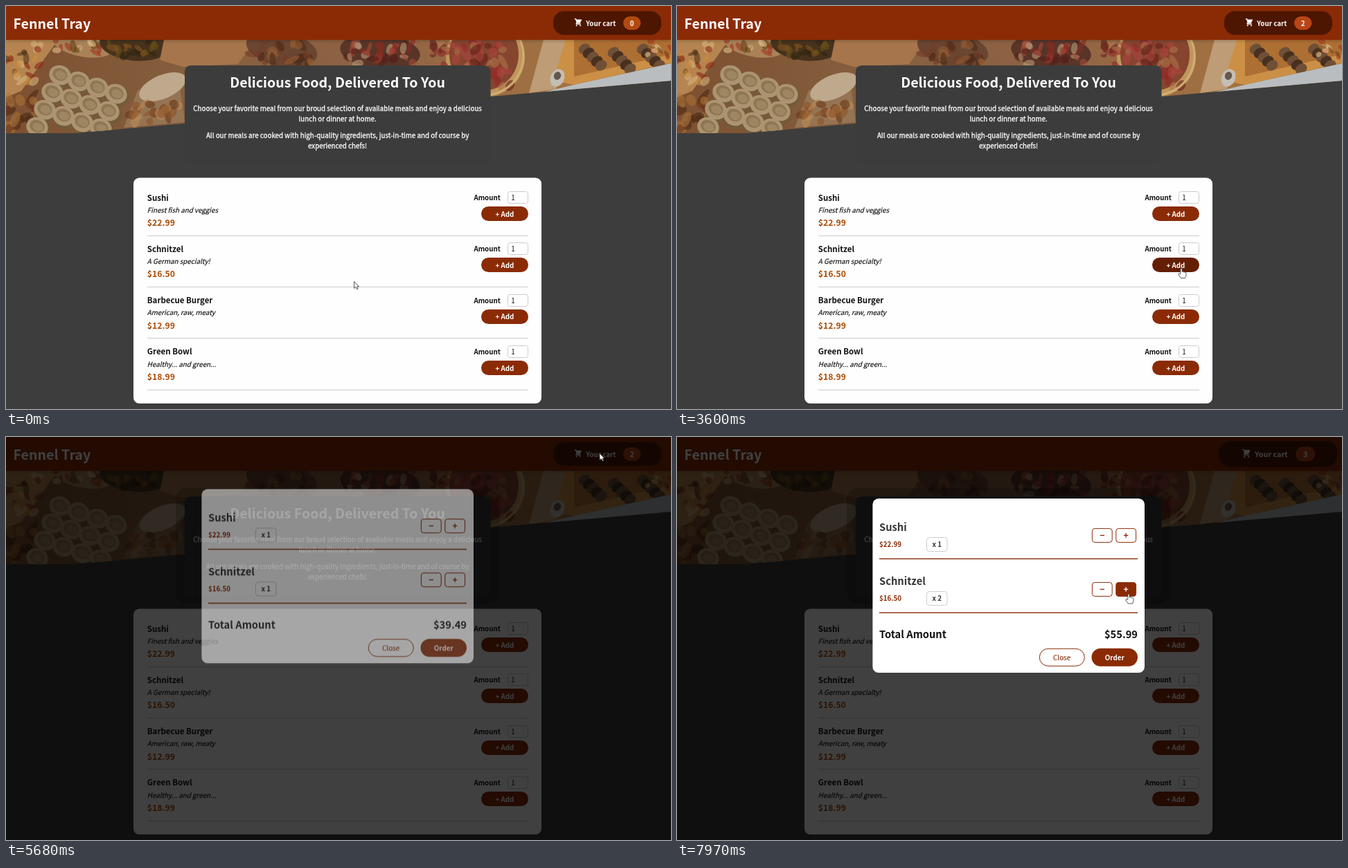
Write an HTML page with a canvas that moves like this. It is 960 px wide and 583 px high and loops after 8000 ms.

```html
<!DOCTYPE html>
<html lang="en">
<head>
<meta charset="utf-8">
<title>Meal ordering</title>
<style>
html, body { margin: 0; width: 100%; height: 100%; overflow: hidden; background: #3d3d3d; }
canvas { display: block; width: 960px; height: 583px; }
</style>
</head>
<body>
<canvas id="stage" width="960" height="583"></canvas>
<script>
const W = 960, H = 583, LOOP = 8000;
const REM = 9.8, MID = 478.6, PITCH = 74.25;
const RUST = '#8a2b06';
const FAMILY = '"Noto Sans CJK JP", "Noto Sans CJK SC", "Noto Sans", sans-serif';
const stage = document.getElementById('stage').getContext('2d');
const layer = Object.assign(document.createElement('canvas'), { width: W, height: H }).getContext('2d');
let ctx = stage;

const ADD_FIRST = 2256, ADD_SECOND = 3595, OPEN_CART = 5570, ADD_THIRD = 7710;
const BUMPS = [ADD_FIRST, 3612, 7787];
const MEALS = [
  ['Sushi', 'Finest fish and veggies', '$22.99'],
  ['Schnitzel', 'A German specialty!', '$16.50'],
  ['Barbecue Burger', 'American, raw, meaty', '$12.99'],
  ['Green Bowl', 'Healthy... and green...', '$18.99']
];
// time, x, y of the pointer tip
const PATH = [
  [0, 502.5, 398.5], [750, 502.5, 398.5], [1390, 721, 297.5], [1690, 721, 297.5],
  [1810, 721, 301.5], [2520, 721, 301.5], [3060, 729, 406], [3420, 728, 379.5],
  [3890, 728, 379.5], [4220, 727, 453], [4590, 727, 453], [5140, 857, 23.5],
  [5700, 857, 23.5], [6350, 506.5, 191], [6390, 506.5, 191], [6560, 427, 200],
  [6960, 700, 226], [7140, 661, 227], [7260, 661, 227], [7310, 652, 227], [8000, 652, 227]
];
const BUMP_KEYS = [[0, 1], [.1, .9], [.3, 1.1], [.5, 1.15], [1, 1]];

const mix = (a, b, p) => a + (b - a) * p;
const smooth = p => p * p * (3 - 2 * p);
const inside = (p, x, y, w, h) => p.x >= x && p.x <= x + w && p.y >= y && p.y <= y + h;

// cubic-bezier(0, 0, .58, 1)
function easeOut(p) {
  let lo = 0, hi = 1;
  for (let i = 0; i < 20; i++) {
    const s = (lo + hi) / 2;
    if (1.74 * s * s * (1 - s) + s ** 3 < p) lo = s; else hi = s;
  }
  return 3 * lo * lo * (1 - lo) + lo ** 3;
}

function pointerAt(t) {
  const i = Math.max(1, PATH.findIndex(k => k[0] > t));
  const [t0, x0, y0] = PATH[i - 1], [t1, x1, y1] = PATH[i];
  const p = smooth((t - t0) / (t1 - t0));
  return { x: mix(x0, x1, p), y: mix(y0, y1, p) };
}

function bumpScale(t) {
  const start = BUMPS.find(b => t >= b && t < b + 300);
  if (start === undefined) return 1;
  const p = (t - start) / 300;
  const i = BUMP_KEYS.findIndex(k => k[0] > p);
  const [p0, s0] = BUMP_KEYS[i - 1], [p1, s1] = BUMP_KEYS[i];
  return mix(s0, s1, easeOut((p - p0) / (p1 - p0)));
}

// Baselines sit on whole pixels; `heavy` thickens the strokes slightly
function text(str, x, y, { size = REM, style = 'bold', color = '#111', align = 'left', heavy = 0 } = {}) {
  ctx.font = `${style} ${size}px ${FAMILY}`;
  ctx.fillStyle = ctx.strokeStyle = color;
  ctx.textAlign = align;
  ctx.fillText(str, x, Math.round(y));
  if (heavy) {
    ctx.lineWidth = heavy;
    ctx.strokeText(str, x, Math.round(y));
  }
}

function box(x, y, w, h, r, fill, stroke, line = 1) {
  ctx.beginPath();
  ctx.roundRect(x, y, w, h, r);
  if (fill) { ctx.fillStyle = fill; ctx.fill(); }
  if (stroke) { ctx.strokeStyle = stroke; ctx.lineWidth = line; ctx.stroke(); }
}

function poly(c, color, ...pts) {
  c.fillStyle = color;
  c.beginPath();
  pts.forEach(([x, y]) => c.lineTo(x, y));
  c.closePath();
  c.fill();
}

function oval(c, color, x, y, rx, ry = rx, turn = 0) {
  c.fillStyle = color;
  c.beginPath();
  c.ellipse(x, y, rx, ry, turn, 0, 7);
  c.fill();
}

// Soft abstract buffet behind the headline
function makeBanner() {
  const canvas = document.createElement('canvas');
  canvas.width = W;
  canvas.height = 190;
  const c = canvas.getContext('2d');
  let seed = 11;
  const rnd = () => (seed = seed * 16807 % 2147483647) / 2147483647;
  const scatter = (n, x, y, w, h, size, colors) => {
    c.globalAlpha = .6;
    for (let i = 0; i < n; i++) {
      oval(c, colors[i % colors.length], x + rnd() * w, y + rnd() * h,
        size * (.6 + rnd()), size * (.4 + rnd() * .5), rnd() * 3);
    }
    c.globalAlpha = 1;
  };
  c.beginPath();
  [[0, 49], [W, 49], [W, 108], [98, 184], [0, 184]].forEach(p => c.lineTo(...p));
  c.clip();
  const base = c.createLinearGradient(0, 0, W, 0);
  base.addColorStop(0, '#7d5030');
  base.addColorStop(.3, '#85603f');
  base.addColorStop(.55, '#8f6244');
  base.addColorStop(1, '#ad7b40');
  c.fillStyle = base;
  c.fillRect(0, 0, W, 190);

  poly(c, '#b58450', [0, 49], [75, 49], [22, 123], [0, 132]);
  scatter(24, 2, 54, 48, 58, 6, ['#8c2717', '#d5b27e', '#573719', '#c98a3c']);
  oval(c, '#a98258', 110, 55, 45, 18, .2);
  scatter(14, 72, 50, 68, 18, 6, ['#a13420', '#674217', '#e0bf8a']);
  oval(c, '#46321c', 185, 56, 50, 23, .1);
  scatter(16, 148, 50, 72, 22, 6, ['#695019', '#82531f', '#302512']);
  poly(c, '#a6754b', [228, 49], [360, 49], [335, 84], [255, 88], [222, 78]);
  poly(c, '#957453', [190, 122], [250, 108], [258, 168], [170, 176]);
  oval(c, '#bfa98c', 226, 117, 36, 17, -.4);
  scatter(18, 178, 140, 76, 34, 8, ['#6b3a1c', '#b98a56', '#8e5428']);
  scatter(20, 0, 130, 60, 48, 8, ['#6d3519', '#a77236', '#4d2b16']);

  for (let i = 0; i < 13; i++) {
    const x = 78 + (i % 4) * 27 - Math.floor(i / 4) * 11;
    const y = 100 + Math.floor(i / 4) * 25 + (i % 4) * 9;
    oval(c, '#735a3a', x + 2, y + 4, 17, 16);
    oval(c, '#ac9470', x, y, 16, 14, .4);
    oval(c, '#8f7653', x, y - 1, 11, 9, .4);
    oval(c, '#9f8662', x + 1, y, 8, 6, .4);
  }

  oval(c, '#6a4530', 398, 62, 52, 25, .2);
  scatter(24, 350, 50, 92, 34, 8, ['#4c2a19', '#925d32', '#743c25']);
  oval(c, '#593528', 540, 66, 58, 25, .1);
  scatter(32, 490, 50, 100, 34, 7, ['#8f2820', '#a34a38', '#552019', '#b99a77']);
  oval(c, '#c0965d', 692, 74, 57, 57);
  oval(c, '#85452e', 690, 70, 50, 52);
  scatter(52, 610, 50, 118, 66, 8, ['#932b27', '#ae4540', '#65221c', '#ad744b']);
  c.strokeStyle = '#d0ad72';
  c.lineWidth = 3;
  c.beginPath();
  c.arc(690, 72, 57, -.4, 1.4);
  c.stroke();

  poly(c, '#bd9c76', [776, 49], [812, 49], [794, 120], [755, 126]);
  poly(c, '#cc8f46', [808, 49], [W, 49], [W, 82], [820, 114], [790, 108]);
  poly(c, '#ae6f33', [820, 49], [W, 49], [W, 70], [820, 102]);
  for (let i = 0; i < 3; i++) {
    for (let j = 0; j < 5; j++) {
      oval(c, j % 2 ? '#49301f' : '#6f5037', 835 + i * 42 + j * 6, 62 + j * 6 + (i % 2) * 5, 9, 7, -.6);
    }
  }
  scatter(12, 920, 51, 40, 24, 5, ['#a83a20', '#e0c28e', '#744319']);
  oval(c, '#c4beb4', 796, 104, 10, 13, .4);
  oval(c, '#63584c', 796, 101, 5, 6, .4);
  poly(c, '#b9bdbf', [W, 83], [W, 112], [770, 126], [820, 114]);
  return canvas;
}
const banner = makeBanner();

function drawCartIcon() {
  ctx.save();
  ctx.translate(819.4, 17.4);
  ctx.scale(.66, .66);
  ctx.strokeStyle = '#fff';
  ctx.lineWidth = 2;
  ctx.lineCap = ctx.lineJoin = 'round';
  ctx.stroke(new Path2D('M3 2H5L7.2 10.5 5.6 12.2Q5.2 13 6.4 13H15'));
  poly(ctx, '#fff', [5.6, 3], [18, 3], [14.3, 11], [7.2, 11]);
  oval(ctx, '#fff', 6.5, 16.5, 1.6);
  oval(ctx, '#fff', 14.5, 16.5, 1.6);
  ctx.restore();
}

function drawHeader(t, hovered) {
  ctx.save();
  ctx.shadowColor = 'rgba(0,0,0,.25)';
  ctx.shadowBlur = 5;
  ctx.shadowOffsetY = 1;
  ctx.fillStyle = RUST;
  ctx.fillRect(0, 0, W, 49);
  ctx.restore();
  text('Fennel Tray', 10.5, 33, { size: REM * 2, color: '#fff' });

  const count = [ADD_FIRST, ADD_SECOND, ADD_THIRD].filter(a => t >= a).length;
  const scale = bumpScale(t);
  ctx.save();
  ctx.translate(868, 24.7);
  ctx.scale(scale, scale);
  ctx.translate(-868, -24.7);
  box(790, 7.6, 156, 34.2, 15.3, hovered ? '#2c0d00' : '#4d1601');
  drawCartIcon();
  text('Your cart', 837.2, 29, { color: '#fff' });
  box(891, 15, 25.3, 19.4, 9.7, count ? '#b94517' : '#b24a10');
  text(count, 903.6, 29, { color: '#fff', align: 'center' });
  ctx.restore();
}

function drawSummary(dimmed) {
  if (dimmed) box(245, 74, 467, 167, 16, 'rgba(0,0,0,.2)');
  box(258, 86, 441.5, 143, 8.6, dimmed ? '#383838' : '#3c3c3c');
  text('Delicious Food, Delivered To You', MID, 118, { size: REM * 2, color: '#fff', align: 'center' });
  [['Choose your favorite meal from our broud selection of available meals and enjoy a delicious', 152],
   ['lunch or dinner at home.', 167],
   ['All our meals are cooked with high-quality ingredients, just-in-time and of course by', 191],
   ['experienced chefs!', 206]
  ].forEach(([line, y]) => text(line, MID, y, { style: 'normal', color: '#fff', align: 'center', heavy: .3 }));
}

const addButton = i => [686, Math.round(290 + i * PITCH), 68, 21];

function drawMeals(hoveredIndex) {
  box(184, 248.6, 589, 326.4, 8.6, '#fefefe');
  MEALS.forEach(([name, about, price], i) => {
    const y = i * PITCH;
    text(name, 203.8, y + 281.6, { size: 11.47 });
    text(about, 203.8, y + 298.8, { style: 'italic', heavy: .15 });
    text(price, 203.8, y + 318.2, { size: 12.25, color: '#ad4d08' });
    ctx.fillStyle = '#ccc';
    ctx.fillRect(204, Math.round(y + 331.8), 550, 1);
    text('Amount', 675.4, y + 281);
    box(724.5, Math.round(y + 268) + .5, 29, 17, 3, '#fff', '#ccc');
    text('1', 729.3, y + 281.2, { style: 'normal' });
    box(...addButton(i), 10.5, i === hoveredIndex ? '#641e03' : RUST);
    text('+ Add', 719.9, y + 304.8, { color: '#fff', align: 'center' });
  });
}

const stepButton = (row, col) => [599.4 + col * 34.4, 132.4 + row * 78, 28.8, 20];

function drawModal(t, pointer) {
  const extra = t >= ADD_THIRD;
  box(282.4, 89, 392.6, 252, 8.6, '#fff');
  MEALS.slice(0, 2).forEach(([name, , price], row) => {
    const y = row * 78;
    text(name, 292, y + 135.5, { size: REM * 1.5, color: '#363636' });
    text(price, 292, y + 159.4, { color: RUST });
    box(360.5, y + 145.5, 29.5, 20, 3.7, null, '#ccc');
    text('x ' + (row && extra ? 2 : 1), 375.2, y + 159.4, { color: '#363636', align: 'center' });
    ['−', '+'].forEach((sign, col) => {
      const rect = stepButton(row, col);
      const hot = inside(pointer, ...rect);
      box(...rect, 3.7, hot ? RUST : null, RUST);
      text(sign, rect[0] + 14.4, rect[1] + 14.6, { size: 12.25, color: hot ? '#fff' : RUST, align: 'center' });
    });
    ctx.fillStyle = RUST;
    ctx.fillRect(292, y + 175.5, 373, 1.4);
  });
  text('Total Amount', 292, 291.4, { size: REM * 1.5 });
  text(extra ? '$55.99' : '$39.49', 665, 291.4, { size: REM * 1.5, align: 'right' });
  box(523.3, 306.3, 65, 25, 12.5, null, RUST);
  text('Close', 555.6, 322.6, { style: 'normal', color: RUST, align: 'center', heavy: .15 });
  box(598.5, 305.8, 66.5, 26, 13, RUST);
  text('Order', 631.7, 322.6, { color: '#fff', align: 'center' });
}

// The modal fades as one flattened layer while it slides down
function showModal(t, pointer) {
  const p = easeOut(Math.min(1, (t - OPEN_CART) / 300));
  layer.clearRect(0, 0, W, H);
  ctx = layer;
  drawModal(t, pointer);
  ctx = stage;
  ctx.globalAlpha = p;
  ctx.drawImage(layer.canvas, 0, -3 * REM * (1 - p));
  ctx.globalAlpha = 1;
}

const ARROW = new Path2D('M0 0V10L2.4 8 4 11.4 5.6 10.7 4.1 7.4H7Z');
const HAND = new Path2D('M-1.2 8.4V.8Q0-.8 1.2.8V5Q2.6 4 3.6 5.4 5 4.6 5.6 6 7 5.6 7 7.2V10Q6.6 12 5.4 14H-.6L-4.2 9Q-4.4 6.4-1.2 8.4Z');

function drawPointer({ x, y }, hand) {
  const shape = hand ? HAND : ARROW;
  ctx.save();
  ctx.translate(x, y);
  ctx.fillStyle = '#fff';
  ctx.strokeStyle = '#222';
  ctx.lineWidth = .75;
  ctx.lineJoin = 'round';
  ctx.fill(shape);
  ctx.stroke(shape);
  ctx.restore();
}

function draw(t) {
  const pointer = pointerAt(t);
  const open = t >= OPEN_CART;
  const overCart = !open && inside(pointer, 790, 7.6, 156, 34.2);
  const overAdd = open ? -1 : MEALS.findIndex((_, i) => inside(pointer, ...addButton(i)));
  const overStep = open && [0, 1].some(r => [0, 1].some(c => inside(pointer, ...stepButton(r, c))));

  ctx.fillStyle = '#3d3d3d';
  ctx.fillRect(0, 0, W, H);
  ctx.drawImage(banner, 0, 0);
  drawSummary(open);
  drawMeals(overAdd);
  drawHeader(t, overCart);
  if (open) {
    ctx.fillStyle = 'rgba(0,0,0,.75)';
    ctx.fillRect(0, 0, W, H);
    showModal(t, pointer);
  }
  drawPointer(pointer, overCart || overAdd >= 0 || overStep);
}

function tick() {
  draw(performance.now() % LOOP);
  requestAnimationFrame(tick);
}
tick();
</script>
</body>
</html>
```
